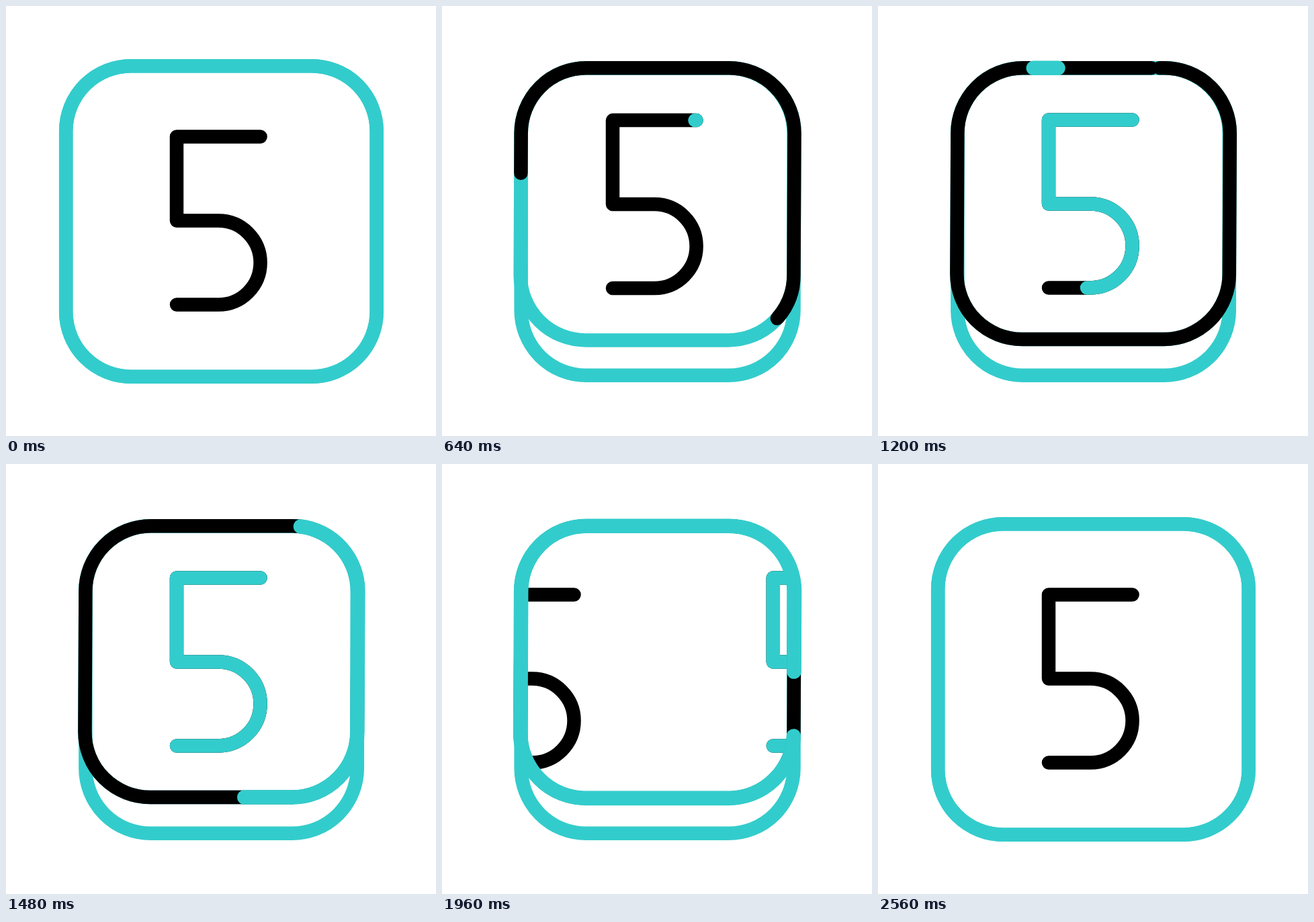
Recreate the animation shown at these times as an HTML page. Size 640 by 640 pixels, loop 2800 ms.

```html
<!DOCTYPE html>
<html lang="en">
<head>
<meta charset="utf-8">
<title>Key five</title>
<style>
  html, body { margin: 0; width: 100%; height: 100%; overflow: hidden; background: #fff; }
  svg { display: block; width: 100vw; height: 100vh; }
  path { fill: none; stroke-width: 20.5; stroke-linecap: round; stroke-linejoin: round; }
  .teal { stroke: #33cccc; }
  .black { stroke: #000; }
  .wide { stroke-width: 21.6; }
</style>
</head>
<body>
<svg viewBox="0 0 640 640">
  <defs>
    <clipPath id="face"><path id="facePath"/></clipPath>
  </defs>
  <path id="base" class="teal"/>
  <g clip-path="url(#face)">
    <g id="leaving">
      <path class="black digit"/>
      <path id="digitTrace" class="teal digit" pathLength="573"/>
    </g>
    <g id="entering"><path class="black digit"/></g>
  </g>
  <path id="front" class="teal"/>
  <path id="blackTrace" class="black" pathLength="1452"/>
  <path id="tealTrace" class="teal wide" pathLength="1452"/>
</svg>
<script>
const LOOP = 2800, STEP = 40, RADIUS = 97, PERIMETER = 1452, DIGIT = 573, TRAVEL = 300;
const $ = id => document.getElementById(id);
const lerp = (a, b, p) => a + (b - a) * p;

// cubic-bezier(1/3, 0, 1/3, 1) between two times
function ease(t, start, length) {
  const u = (t - start) / length;
  if (u <= 0) return 0;
  if (u >= 1) return 1;
  let lo = 0, hi = 1;
  for (let i = 0; i < 24; i++) {
    const s = (lo + hi) / 2;
    if (s * (1 - s) + s * s * s < u) lo = s; else hi = s;
  }
  return lo * lo * (3 - 2 * lo);
}

// Rounded box, clockwise from the top edge; lean shifts the lower corners
function box(l, r, top, bottom, lean) {
  const R = RADIUS, arc = (x, y) => `A${R} ${R} 0 0 1 ${x} ${y}`;
  const bl = l - lean, br = r - lean;
  return `M${l + R} ${top}H${r - R}` + arc(r, top + R) +
    `L${br} ${bottom - R}` + arc(br - R, bottom) +
    `H${bl + R}` + arc(bl, bottom - R) +
    `L${l} ${top + R}` + arc(l + R, top) + "Z";
}

function trace(el, start, part, shown) {
  el.style.display = shown && part > 0 ? "" : "none";
  const len = part * PERIMETER;
  el.setAttribute("stroke-dasharray", part < 1 ? `${len} ${PERIMETER - len}` : "none");
  el.setAttribute("stroke-dashoffset", -start);
}

function draw(t) {
  const lift = ease(t, 40, 724) - ease(t, 1908, 606);
  const l = lerp(89.2, 118.4, lift), r = lerp(551.7, 523.8, lift);
  const top = lerp(89.2, 92.3, lift);
  const face = box(l, r, top, lerp(551.7, 496, lift), lift);
  for (const id of ["facePath", "front", "blackTrace", "tealTrace"]) $(id).setAttribute("d", face);
  $("base").setAttribute("d", box(l, r - lift, top, lerp(551.7, 549.8, lift), 0));

  trace($("blackTrace"), -211 + 0.741 * (t - 640), ease(t, 143, 1178), t < 2270);
  trace($("tealTrace"), 16 + 0.741 * (t - 1200), ease(t, 1098, 1178), t < 2270);

  const drawn = ease(t, 610, 871);
  $("digitTrace").style.display = drawn > 0 ? "" : "none";
  $("digitTrace").setAttribute("stroke-dasharray", drawn < 1 ? `${drawn * DIGIT} ${DIGIT * 2}` : "none");

  const out = ease(t, 1591, 655), come = ease(t, 1710, 773);
  $("leaving").style.display = out < 1 ? "" : "none";
  $("leaving").setAttribute("transform", `translate(${TRAVEL * out} ${-25.1 * ease(t, 40, 724)})`);
  $("entering").style.display = come > 0 ? "" : "none";
  $("entering").setAttribute("transform", `translate(${TRAVEL * (come - 1)} 0)`);
}

for (const el of document.querySelectorAll(".digit"))
  el.setAttribute("d", "M378.6 194.6H254V319.6H316.2A62.4 62.4 0 0 1 316.2 444.5H254");

const begin = performance.now();
function tick() {
  const t = Math.max(0, performance.now() - begin) % LOOP;
  draw(Math.floor(t / STEP) * STEP);
  requestAnimationFrame(tick);
}
tick();
</script>
</body>
</html>
```
